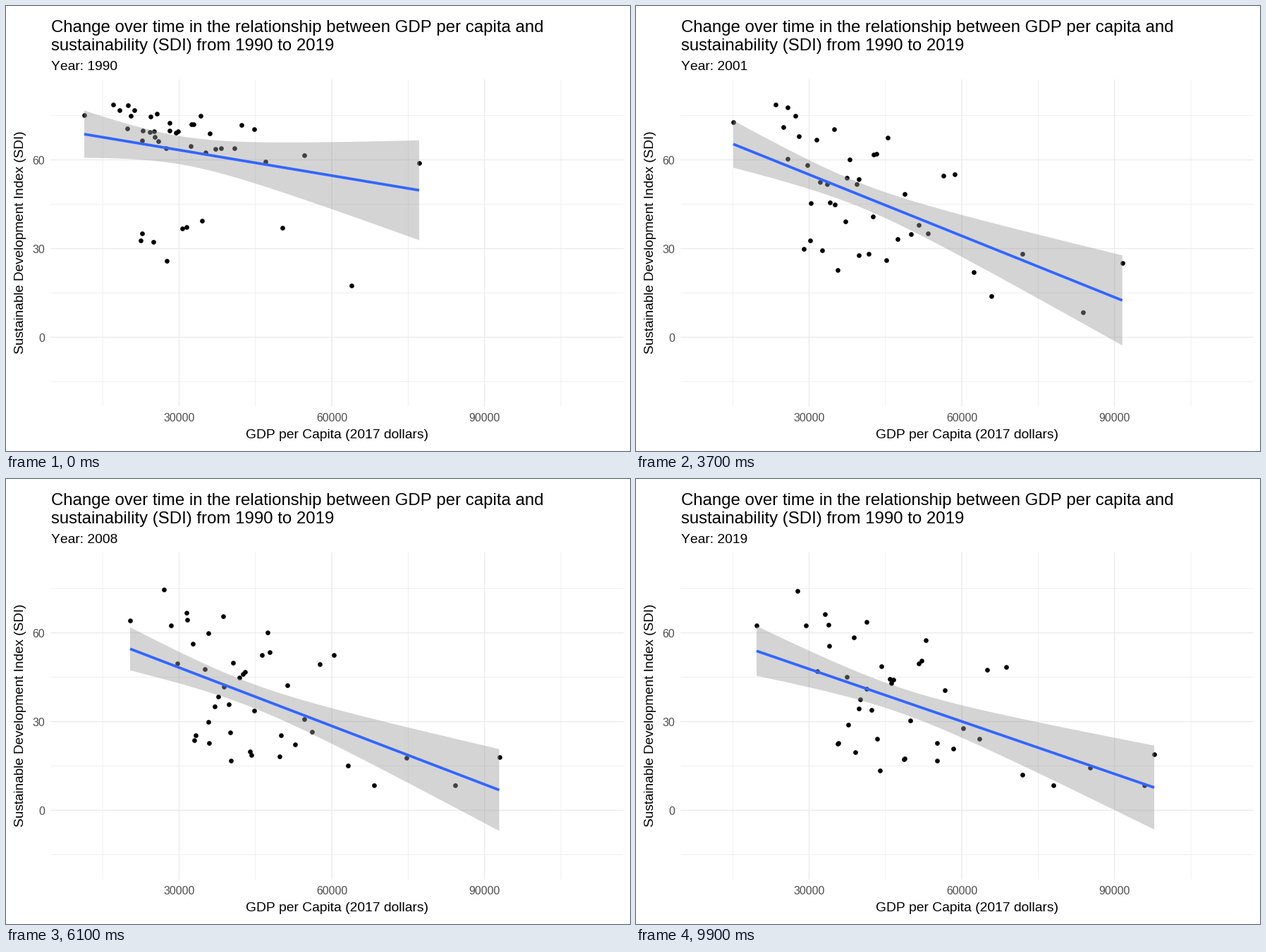
These frames come from a looping animation (885 px wide and 632 px high, 10000 ms). A matplotlib script:

```python
import numpy as np
import matplotlib.pyplot as plt
from matplotlib.animation import FuncAnimation

plt.rcParams["font.family"] = "Liberation Sans"
plt.rcParams["text.kerning_factor"] = 6

W, H = 885, 632
N = 100
FIRST, LAST = 1990, 2019
COUNTRIES = 43

# Ends of the fitted line at a few steps: step, x0, x1, y0, y1.
ENDS = np.array([
    [0, 111, 586, 182, 261.7],
    [14, 100.5, 590, 161.7, 364.5],
    [20, 109, 654, 170, 398],
    [27, 123, 651, 177.7, 400.7],
    [46, 151.5, 724.5, 212.7, 433.7],
    [48, 152, 742, 214, 439],
    [61, 176, 699.5, 241.2, 441.7],
    [72, 127, 838, 228, 474],
    [84, 143.5, 775.5, 239.2, 451.7],
    [88, 141, 742, 238, 443],
    [99, 171, 735, 244.2, 438.2]])

# Slow trends: step, mean GDP position, band half-height there, band flare.
TRENDS = np.array([
    [0, 246, 20, 0.200],
    [46, 330, 16.5, 0.155],
    [99, 368, 17.8, 0.155]])


def at(keys, i):
    return [np.interp(i, keys[:, 0], col) for col in keys.T[1:]]


# Incomes follow a log-logistic spread; ranks decide the gap to the line.
rng = np.random.default_rng(7)
q = (np.arange(COUNTRIES) + 0.5) / COUNTRIES
income = np.exp(0.33 * np.log(q / (1 - q)))
rank = rng.permutation(q)
early_gap = np.where(rank > 0.8, 350 * rank - 190, 70 * rank - 55)
late_gap = 220 * (rank - 0.5)
phase = rng.uniform(0, 2 * np.pi, (2, COUNTRIES))


def fit_at(i):
    x0, x1, y0, y1 = at(ENDS, i)
    mean, waist, flare = at(TRENDS, i)
    x = np.linspace(x0, x1, 80)
    return x, np.linspace(y0, y1, 80), np.hypot(waist, flare * (x - mean))


def cloud_at(i, line_x, line_y):
    x0, x1 = line_x[0], line_x[-1]
    sway_x, sway_y = 5 * np.sin(2 * np.pi * i / 45 + phase)
    centre = at(TRENDS, i)[0] - 10
    x = np.clip(x0 + (centre - x0) * income + sway_x, x0, x1 - 14)
    x[0], x[-1] = x0, x1
    mix = min(i / 46, 1)
    gap = early_gap + (late_gap - early_gap) * mix + sway_y
    y = np.interp(x, line_x, line_y) + gap
    return x, np.clip(y, 140, 435)


# At 72 dpi one point is one pixel.
fig = plt.figure(figsize=(W / 72, H / 72), dpi=72, facecolor="white")
ax = fig.add_axes([0, 0, 1, 1])
ax.set_xlim(0, W)
ax.set_ylim(H, 0)
ax.axis("off")

LEFT, RIGHT, TOP, BOTTOM = 64, 875, 105, 568
XS = 245.5 + 108.3 * np.arange(-1, 6)
YS = 155.5 + 63 * np.arange(7)
for k, (x, y) in enumerate(zip(XS, YS)):
    style = dict(color="#EBEBEB", lw=1.4 if k % 2 else 0.75, snap=False, zorder=1)
    ax.plot([x, x], [TOP, BOTTOM], **style)
    ax.plot([LEFT, RIGHT], [y, y], **style)


def label(x, y, s, size, color="black", **kw):
    return ax.text(x, y, s, fontsize=size, color=color, va="baseline", **kw)


label(LEFT, 37, "Change over time in the relationship between GDP per capita and", 24.05)
label(LEFT, 63, "sustainability (SDI) from 1990 to 2019", 24.05)
year = label(LEFT, 91, "", 19.2)
label(469.7, 614.5, "GDP per Capita (2017 dollars)", 19.25, ha="center")
label(25, 336, "Sustainable Development Index (SDI)", 19,
      ha="center", rotation=90, rotation_mode="anchor")
for k in range(3):
    label(XS[2 * k + 1], 589.5, str(30000 * (k + 1)), 15.9, "#4D4D4D", ha="center")
    label(55, YS[2 * k + 1] + 6.5, str(60 - 30 * k), 15.9, "#4D4D4D", ha="right")

dots, = ax.plot([], [], "o", color="black", ms=6.7, mew=0, zorder=2)
band, = ax.fill([0, 0, 0], [0, 0, 0], color="#999999", alpha=0.42, lw=0, zorder=3)
line, = ax.plot([], [], color="#3366FF", lw=3.8, solid_capstyle="butt", zorder=4)


def draw(i):
    x, y, h = fit_at(i)
    dots.set_data(*cloud_at(i, x, y))
    band.set_xy(np.column_stack([np.r_[x, x[::-1]], np.r_[y - h, (y + h)[::-1]]]))
    line.set_data(x, y)
    year.set_text(f"Year: {round(FIRST + (LAST - FIRST) * i / (N - 1))}")
    return dots, band, line, year


anim = FuncAnimation(fig, draw, frames=N, interval=100, repeat=True, repeat_delay=0)
plt.show()
```
